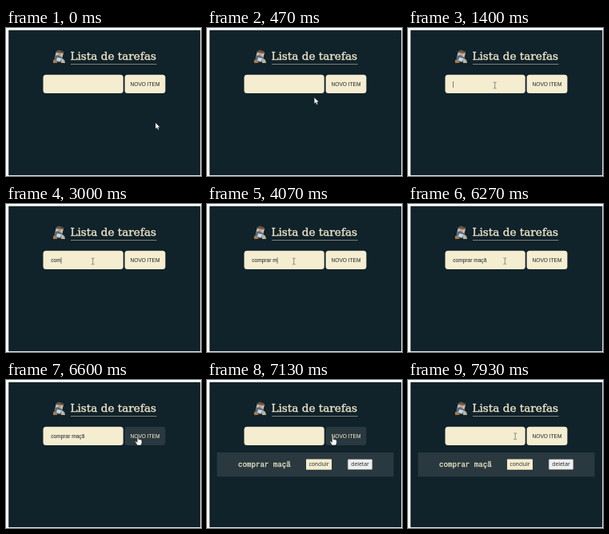
Recreate the animation shown at these times as an HTML page. Size 244 by 186 pixels, loop 8000 ms.

```html
<!DOCTYPE html>
<html lang="pt-BR">
<head>
<meta charset="utf-8">
<title>Lista de tarefas</title>
<style>
  html, body { margin: 0; width: 100%; height: 100%; overflow: hidden; background: #fff; }
  svg { display: block; width: 244px; height: 186px; }
  text { white-space: pre; }
  .ui { font: 6.6px "Liberation Sans", Arial, sans-serif; fill: #30373a; stroke: #30373a; stroke-width: .08px; }
  .small { font: 6.7px "Noto Sans", sans-serif; fill: #20282b; text-anchor: middle; }
  .title { font: 13.6px "DejaVu Serif", serif; fill: #ebe4c6; stroke: #ebe4c6; stroke-width: .4px; }
  .task { font: 9.15px "Liberation Mono", monospace; fill: #ebe4c6; stroke: #ebe4c6; stroke-width: .28px; }
  .cream { fill: #f5edd0; }
  .hover rect { fill: #2a393f; }
  .hover text { fill: #ebe4c6; stroke: #ebe4c6; }
</style>
</head>
<body>
<svg viewBox="0 0 244 186">
  <rect x="3.2" y="2.7" width="240" height="182.4" fill="#10222a"/>

  <g id="icon">
    <path d="M63 29l9 2-2 8-9-2z" fill="#c5c2b6"/>
    <path d="M63 29l3-1.5 6 2-1 2.5-8-1z" fill="#6b5344"/>
    <path d="M65 32h4v3h-4z" fill="#c99b78"/>
    <path d="M61 35l4-1 6 3 1 6H60z" fill="#546b84"/>
    <path d="M64 37l5 1-1 4-5-1z" fill="#d9d8d0"/>
    <path d="M59 40l4 0 1 4h-5z" fill="#a8784f"/>
    <path d="M69 38l4 2 1 4h-5z" fill="#b9b3a6"/>
  </g>
  <text class="title" x="80.5" y="40.3">Lista de tarefas</text>
  <rect x="81" y="45.2" width="107.5" height=".8" fill="#9b998a"/>

  <rect class="cream" x="46.5" y="58.8" width="100.2" height="23.3" rx="3.5"/>
  <text class="ui" id="entry" x="56.2" y="73.2"></text>
  <rect id="caret" y="67" width=".7" height="8" fill="#4a5052"/>

  <g id="add">
    <rect class="cream" x="148.6" y="58.8" width="50.8" height="23.3" rx="3.5"/>
    <text class="ui" x="174" y="73.3" text-anchor="middle">NOVO ITEM</text>
  </g>

  <g id="row">
    <rect x="12.5" y="91" width="221" height="30.5" fill="#2a393f"/>
    <text class="task" x="39" y="109">comprar maçã</text>
    <rect class="cream" x="124" y="99.5" width="32" height="13.2" rx=".6"/>
    <text class="small" x="140" y="108.4">concluir</text>
    <rect x="176.2" y="99.7" width="30.6" height="12.8" rx="1" fill="#efefef" stroke="#858b8d" stroke-width=".5"/>
    <text class="small" x="191.5" y="108.4">deletar</text>
  </g>

  <g id="pointer">
    <path id="arrow" d="M0 0v8l1.9-1.7 1.2 2.8 1.4-.6-1.2-2.7h2.5z" fill="#fff" stroke="#111" stroke-width=".4"/>
    <path id="beam" d="M-1.9-4Q0-4 0-3Q0-4 1.9-4M0-3V3M-1.9 4Q0 4 0 3Q0 4 1.9 4" fill="none" stroke="#5c6060" stroke-width=".7"/>
    <path id="hand" d="M-.8 .6Q0-.5 .8 .6V4l1.5.2 1.5.4 1.2.9V8.5L4 11.5H-.8L-3.3 7.3Q-3.3 6-2.2 6.5L-.8 7.8z" fill="#fff" stroke="#111" stroke-width=".5"/>
  </g>
</svg>
<script>
const LOOP = 8000, TICK = 1000 / 15, BLINK = 530;
const WORD = 'comprar maçã';
const KEY_TIMES = [2800, 2870, 3000, 3270, 3400, 3530, 3670, 3870, 4070, 4270, 4470, 5330];
const FOCUS = 1130, BLUR = 6260, ADDED = 6800;
// time, x, y of the pointer's resting points
const PATH = [[0, 187, 119], [50, 187, 119], [730, 108.7, 72], [6130, 108.7, 72],
              [6590, 165, 70.5], [6800, 165, 70.5], [7120, 157.3, 70.5], [7670, 134.2, 70.7]];

const el = id => document.getElementById(id);
const [entry, caret, add, row, pointer, arrow, beam, hand] =
  ['entry', 'caret', 'add', 'row', 'pointer', 'arrow', 'beam', 'hand'].map(el);
const show = (node, on) => node.setAttribute('visibility', on ? 'visible' : 'hidden');
const ease = p => p * p * (3 - 2 * p);

function pointerAt(t) {
  const i = PATH.findIndex(p => p[0] > t);
  if (i < 0) return PATH.at(-1).slice(1);
  const [a, b] = [PATH[i - 1], PATH[i]];
  const k = ease((t - a[0]) / (b[0] - a[0]));
  return [a[1] + (b[1] - a[1]) * k, a[2] + (b[2] - a[2]) * k];
}

function render(time) {
  const t = Math.floor((time % LOOP + 4) / TICK) * TICK + 4;

  const typed = KEY_TIMES.filter(k => k <= t).length;
  entry.textContent = t < ADDED ? WORD.slice(0, typed) : '';
  const lastInput = typed ? KEY_TIMES[typed - 1] : FOCUS;
  const lit = Math.floor((t - lastInput) / BLINK) % 2 === 0;
  show(caret, t >= FOCUS && t < BLUR && lit);
  caret.setAttribute('x', 56.2 + (typed ? entry.getComputedTextLength() : 0));

  show(row, t >= ADDED);

  const [x, y] = pointerAt(t);
  const level = y > 59 && y < 82;
  const overInput = level && x > 46 && x < 147;
  const overButton = level && x > 148.7 && x < 199;
  add.setAttribute('class', overButton ? 'hover' : '');
  pointer.setAttribute('transform', `translate(${x} ${y})`);
  show(beam, overInput);
  show(hand, overButton);
  show(arrow, !overInput && !overButton);
}

const start = performance.now();
function frame() {
  render(performance.now() - start);
  requestAnimationFrame(frame);
}
frame();
</script>
</body>
</html>
```
